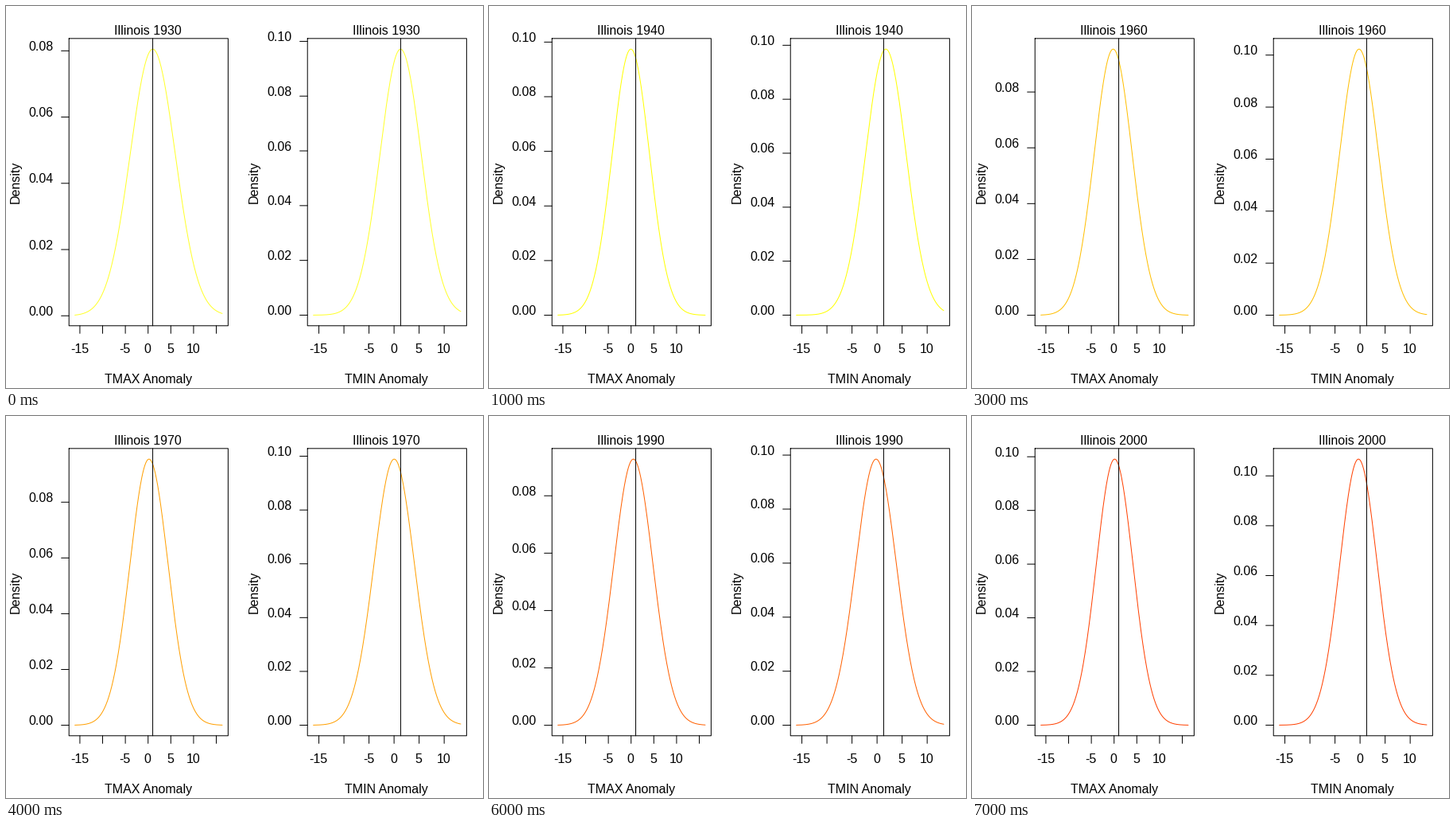
Animation, 600 px wide and 480 px high, one loop 8000 ms. Source, as a matplotlib script:

```python
import numpy as np
import matplotlib.pyplot as plt
from matplotlib.animation import FuncAnimation

W, H = 600, 480
TOP, BOTTOM = 40.82, 401.78
BOX_W = 200.16
PAD = 0.04 / 1.08

# decade: colour, then (mean, sd) for TMAX and TMIN
DECADES = [
    (1930, "#FFFF2A", (1.02, 4.955), (1.30, 4.106)),
    (1940, "#FFFF00", (-0.05, 4.095), (1.75, 4.047)),
    (1950, "#FFDF00", (-0.65, 4.000), (-0.08, 3.785)),
    (1960, "#FFBF00", (-0.20, 4.183), (-0.20, 3.900)),
    (1970, "#FF9F00", (0.20, 4.180), (0.03, 4.033)),
    (1980, "#FF8000", (0.88, 4.605), (-0.12, 4.372)),
    (1990, "#FF6000", (0.50, 4.300), (-0.20, 4.050)),
    (2000, "#FF4000", (0.12, 4.025), (-0.32, 3.738)),
]

# panel offset, variable, x range, reference mean
PANELS = [
    (0, "TMAX", -16.1, 16.3, 1.02),
    (300, "TMIN", -16.1, 13.3, 1.32),
]

plt.rcParams["font.family"] = "Liberation Sans"
plt.rcParams["font.size"] = 16

fig = plt.figure(figsize=(W / 72, H / 72), dpi=72, facecolor="white")
ax = fig.add_axes([0, 0, 1, 1])


def line(xs, ys, color="black"):
    ax.plot(xs, ys, color=color, lw=1, snap=False,
            solid_capstyle="round", solid_joinstyle="round")


def label(x, y, text, ha="center", **kw):
    ax.text(x, y, text, ha=ha, va="baseline", color="black", **kw)


def panel(offset, name, lo, hi, ref, year, color, mean, sd):
    left = offset + 79.22
    right = left + BOX_W
    middle = offset + 178.8

    grid = np.linspace(lo, hi, 300)
    dens = np.exp(-((grid - mean) / sd) ** 2 / 2) / (sd * np.sqrt(2 * np.pi))
    d_min, d_max = dens.min(), dens.max()
    height = BOTTOM - TOP

    def to_x(v):
        return left + BOX_W * (PAD + (v - lo) / (hi - lo) / 1.08)

    def to_y(d):
        return BOTTOM - height * (PAD + (d - d_min) / (d_max - d_min) / 1.08)

    line(to_x(grid), to_y(dens), color)
    line([to_x(ref)] * 2, [TOP, BOTTOM])
    line([left, right, right, left, left], [TOP, TOP, BOTTOM, BOTTOM, TOP])

    for v in range(-15, 16, 5):
        x = to_x(v)
        if x > right:
            continue
        line([x, x], [BOTTOM, BOTTOM + 9.6])
        if v not in (-10, 15):
            label(x - 0.5, 436, str(v))

    for d in np.arange(6) * 0.02:
        y = to_y(d)
        if y < TOP:
            continue
        line([left - 9.6, left], [y, y])
        label(offset + 59.5, y - 0.5, f"{d:.2f}", ha="right")

    label(middle, 36, f"Illinois {year}")
    label(middle, 474, f"{name} Anomaly")
    label(offset + 17, 221, "Density", rotation=90, rotation_mode="anchor")


def draw(i):
    ax.clear()
    ax.set_xlim(0, W)
    ax.set_ylim(H, 0)
    ax.axis("off")
    year, color, *fits = DECADES[i]
    for spec, (mean, sd) in zip(PANELS, fits):
        panel(*spec, year, color, mean, sd)
    return []


anim = FuncAnimation(fig, draw, frames=len(DECADES), init_func=lambda: [],
                     interval=1000, repeat=True)
plt.show()
```
